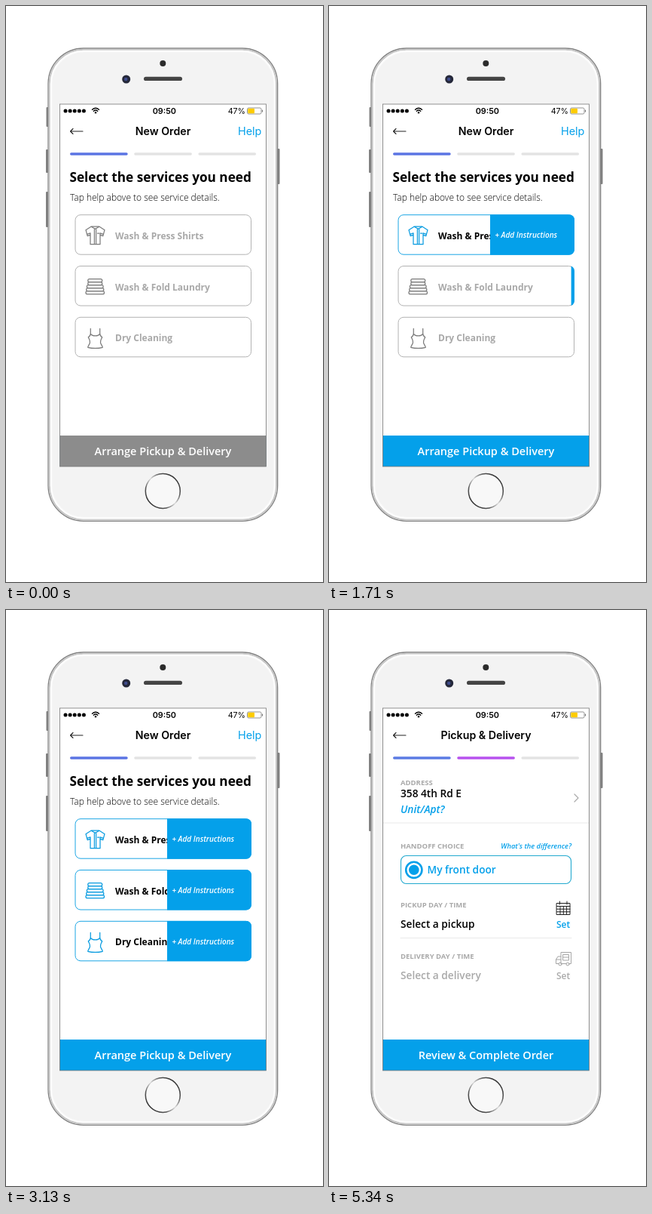
Recreate the animation shown at these times as an HTML page. Size 421 by 763 pixels, loop 8 s.

```html
<!DOCTYPE html>
<html lang="en">
<head>
<meta charset="utf-8">
<title>Laundry order</title>
<style>
  html, body { margin: 0; width: 100%; height: 100%; overflow: hidden; background: #fff; }
  svg { display: block; width: 100%; height: 100%; font-family: "Open Sans", sans-serif; }
  .system { font-family: Inter, sans-serif; }
  .title { font: 600 14.2px Inter, sans-serif; text-anchor: middle; }
  .button { font-weight: 600; font-size: 14.5px; fill: #fff; text-anchor: middle; }
  .caption { font-weight: 700; font-size: 9.5px; fill: #a9a9a9; }
  .value { font-weight: 600; font-size: 13.7px; }
  .set { font-weight: 600; font-size: 12px; }
  .hint { font-weight: 600; font-style: italic; }
  .blue { fill: #04a0ea; }
  .gray { fill: #a9a9a9; }
  .line { fill: none; stroke: currentColor; stroke-linejoin: round; stroke-linecap: round; }
  .card { color: #7c7c7c; }
  .card .line { stroke-width: 1.25; }
  .card .frame { fill: #fff; stroke: #b2b2b2; }
  .card .label { font-weight: 700; font-size: 12px; fill: #a9a9a9; }
  .card.on { color: #0a9ce0; }
  .card.on .frame { stroke: #1ba5e4; }
  .card.on .label { fill: #000; }
</style>
</head>
<body>
<svg viewBox="0 0 421 763">
  <defs>
    <clipPath id="screen"><rect x="71.5" y="130" width="274" height="480"/></clipPath>
    <clipPath id="cardShape"><rect x="91.5" y="0" width="234.5" height="53.5" rx="7"/></clipPath>
    <linearGradient id="metal" x1="0" y1="1" x2="1" y2="0">
      <stop offset="0" stop-color="#111"/><stop offset=".3" stop-color="#555"/>
      <stop offset=".5" stop-color="#ddd"/><stop offset=".7" stop-color="#555"/>
      <stop offset="1" stop-color="#111"/>
    </linearGradient>
  </defs>

  <!-- Phone body -->
  <g fill="#808080">
    <rect x="53.5" y="134" width="3" height="26" rx="1"/>
    <rect x="53" y="190" width="3" height="31" rx="1"/>
    <rect x="53" y="246" width="3" height="47" rx="1"/>
    <rect x="360.5" y="189" width="3" height="47" rx="1"/>
  </g>
  <rect x="56" y="56" width="304.7" height="626.3" rx="47" fill="#f3f3f3" stroke="#808080" stroke-width="1.3"/>
  <rect x="57.7" y="57.7" width="301.3" height="622.9" rx="45.3" fill="none" stroke="#c6c6c6" stroke-width="2"/>
  <rect x="60" y="60" width="296.7" height="618.3" rx="43" fill="none" stroke="#fcfcfc" stroke-width="2.4"/>
  <circle cx="208.3" cy="76" r="4" fill="#2b2b2b"/>
  <circle cx="159.7" cy="97" r="5.5" fill="#25283a"/>
  <circle cx="159.2" cy="97" r="2.3" fill="#3f4c8c"/>
  <rect x="183" y="93.7" width="51" height="5.4" rx="2.7" fill="#444"/>
  <circle cx="208.3" cy="642.5" r="23" fill="#f8f8f8" stroke="url(#metal)" stroke-width="1.5"/>

  <g clip-path="url(#screen)">
    <rect x="71" y="130" width="275" height="480" fill="#fff"/>
    <g id="delivery"></g>
    <g id="services"></g>
    <g id="status" class="system"></g>
  </g>
  <rect x="71.5" y="130" width="274" height="480" fill="none" stroke="#777" stroke-width=".8"/>
</svg>

<script>
const LOOP = 8000, STEP = 30, DURATION = 237;
const BLUE = '#04a0ea', EMPTY = '#e3e3e3';
const PANEL_WIDTH = 112, PAGE_WIDTH = 274;
const byId = id => document.getElementById(id);

const text = (x, y, content, cls, extra = '') =>
  `<text x="${x}" y="${y}" class="${cls}" ${extra}>${content}</text>`;
const line = (d, extra = '') => `<path class="line" d="${d}" ${extra}/>`;
const progressBars = colors => colors.map((color, i) =>
  `<rect x="${85 + i * 85.2}" y="194.3" width="76.7" height="3.4" rx="1.7" fill="${color}"/>`).join('');
const backArrow = line('M102 166H85.5M89 162.5L85.5 166L89 169.5', 'color="#222" stroke-width="1.1"');
const button = (label, id, color) =>
  `<rect id="${id}" x="71" y="569" width="275" height="41" fill="${color}"/>` + text(208.5, 595, label, 'button');

// Icons are placed relative to the top of their card.
const shirt = line('M113 16L106 20.5L108.2 28.5L112 27V39.5H125V27L128.8 28.5L131 20.5L124 16'
  + 'L118.5 19L113 16H124M117.4 19V39.5M119.6 19V39.5M107.6 26.2L112 24.6V27M129.4 26.2L125 24.6V27M121.5 25H123.5');
const stack = [0, 1, 2, 3, 4].map(i => {
  const inset = [2.8, 2.8, 1.4, .7, 0][i];
  return `<rect class="line" x="${106 + inset}" y="${17.7 + i * 4}" width="${24.5 - 2 * inset}" height="4" rx="2"/>`;
}).join('');
const tankTop = line('M112.3 15.5V22C112.3 25 111 26 109.3 27C110.3 29.5 112 31 111.5 34C111 36.5 109 38 108.8 40.5'
  + 'C115 42 122 42 128.2 40.5C128 38 126 36.5 125.5 34C125 31 126.7 29.5 127.7 27C126 26 124.7 25 124.7 22V15.5'
  + 'M112.3 22.5C115 26 122 26 124.7 22.5');

const card = ([label, icon], i) => `
  <g class="card" transform="translate(0 ${276.2 + i * 67.8})">
    <rect class="frame" x="92" y=".5" width="233.5" height="52.5" rx="7"/>
    ${icon}${text(145, 32.5, label, 'label')}
    <g clip-path="url(#cardShape)"><g class="panel">
      <rect x="214" y="0" width="113" height="54" fill="${BLUE}"/>
      ${text(220.5, 31, '+ Add Instructions', 'hint', 'font-size="10" fill="#fff"')}
    </g></g>
  </g>`;

byId('services').innerHTML =
  '<rect x="71" y="131" width="274.5" height="479" fill="#fff"/>' + backArrow
  + text(208.5, 171, 'New Order', 'title')
  + text(308, 171, 'Help', 'system blue', 'font-size="14.4"')
  + progressBars(['#5b74e3', EMPTY, EMPTY])
  + text(84.5, 233, 'Select the services you need', '', 'font-size="17.2" font-weight="700"')
  + text(85, 257.5, 'Tap help above to see service details.', '', 'font-size="12" font-weight="300"')
  + [['Wash &amp; Press Shirts', shirt], ['Wash &amp; Fold Laundry', stack], ['Dry Cleaning', tankTop]].map(card).join('')
  + button('Arrange Pickup &amp; Delivery', 'arrange', '#8c8c8c');

const calendar = line('M302.5 388.5H320V403.5H302.5ZM302.5 392.5H320M302.5 396.2H320M302.5 399.8H320'
  + 'M307 392.5V403.5M311.3 392.5V403.5M315.6 392.5V403.5M306.5 386V390M316 386V390', 'color="#222"');
const truck = `<g color="#a5a5a5">`
  + line('M308 468.5V453.5H321.5V468.5H319M315 468.5H309M305 468.5H301.5V463L304 459H308'
    + 'M301.5 463H308M311 456.5H318.5V464H311ZM311 460H318.5')
  + [307, 317].map(x => `<circle class="line" cx="${x}" cy="469" r="2"/>`).join('') + '</g>';

byId('delivery').innerHTML = backArrow
  + text(208.5, 171, 'Pickup &amp; Delivery', 'title')
  + progressBars(['#5b7be3', '#b752ee', EMPTY])
  + text(95, 231.5, 'ADDRESS', 'caption')
  + text(95, 248, '358 4th Rd E', 'value')
  + text(95, 269, 'Unit/Apt?', 'value hint blue')
  + line('M326 244L331 249L326 254', 'color="#aaa" stroke-width="1.2"')
  + line('M71 282H346M95 434.5H322', 'color="#e9e9e9"')
  + text(95, 316, 'HANDOFF CHOICE', 'caption')
  + text(322, 316, "What's the difference?", 'hint blue', 'font-size="9.3" text-anchor="end"')
  + '<rect x="95.5" y="325.5" width="226" height="37" rx="7" fill="#fff" stroke="#22a9cf" stroke-width="1.1"/>'
  + `<circle cx="112.8" cy="344.3" r="10.6" fill="none" stroke="${BLUE}" stroke-width="2.6"/>`
  + `<circle cx="112.8" cy="344.3" r="6.8" fill="${BLUE}"/>`
  + text(130.5, 349, 'My front door', 'value blue')
  + text(95, 394, 'PICKUP DAY / TIME', 'caption')
  + text(95, 421, 'Select a pickup', 'value')
  + calendar + text(302, 421, 'Set', 'set blue')
  + text(95, 462, 'DELIVERY DAY / TIME', 'caption')
  + text(95, 489, 'Select a delivery', 'value gray')
  + truck + text(302, 489, 'Set', 'set gray')
  + button('Review &amp; Complete Order', 'review', BLUE);

byId('status').innerHTML =
  [0, 1, 2, 3, 4].map(i => `<circle cx="${79 + i * 6.1}" cy="139" r="2.5"/>`).join('')
  + line('M114.5 137.3Q119 133 123.5 137.3M116.3 139.3Q119 136.8 121.7 139.3', 'color="#000" stroke-width="1.4"')
  + '<circle cx="119" cy="141.3" r="1.2"/>'
  + text(210.3, 142.7, '09:50', '', 'font-size="10.8" font-weight="600" text-anchor="middle"')
  + text(318, 142.7, '47%', '', 'font-size="10.6" text-anchor="end"')
  + '<rect x="320.5" y="135" width="18.5" height="8" rx="1.8" fill="#fff" stroke="#777" stroke-width=".8"/>'
  + '<rect x="321.3" y="135.8" width="8.7" height="6.4" rx="1" fill="#fc0"/>'
  + '<rect x="339.9" y="137.4" width="1.2" height="3.2" rx=".6" fill="#777"/>';

// Sine ease in steps; "lead" is how far the motion has already run at its first step.
function slide(time, first, last, lead) {
  if (time < first) return 0;
  if (time >= last) return 1;
  const elapsed = Math.floor((time - first) / STEP) * STEP + lead;
  return (1 - Math.cos(Math.PI * Math.min(1, elapsed / DURATION))) / 2;
}

const cardTimes = [[500, 710, 12], [1710, 1920, 30], [2920, 3130, 30]];
const cards = [...document.querySelectorAll('.card')];

function draw(time) {
  cards.forEach((element, i) => {
    const shown = slide(time, ...cardTimes[i]);
    element.classList.toggle('on', shown === 1);
    element.querySelector('.panel').setAttribute('transform', `translate(${PANEL_WIDTH * (1 - shown)} 0)`);
  });
  byId('arrange').setAttribute('fill', time >= cardTimes[0][1] ? BLUE : '#8c8c8c');
  const page = slide(time, 5160, 5340, 57);
  byId('services').setAttribute('transform', `translate(${-PAGE_WIDTH * page} 0)`);
}

const start = performance.now();
function tick() {
  draw((performance.now() - start) % LOOP);
  requestAnimationFrame(tick);
}
tick();
</script>
</body>
</html>
```
